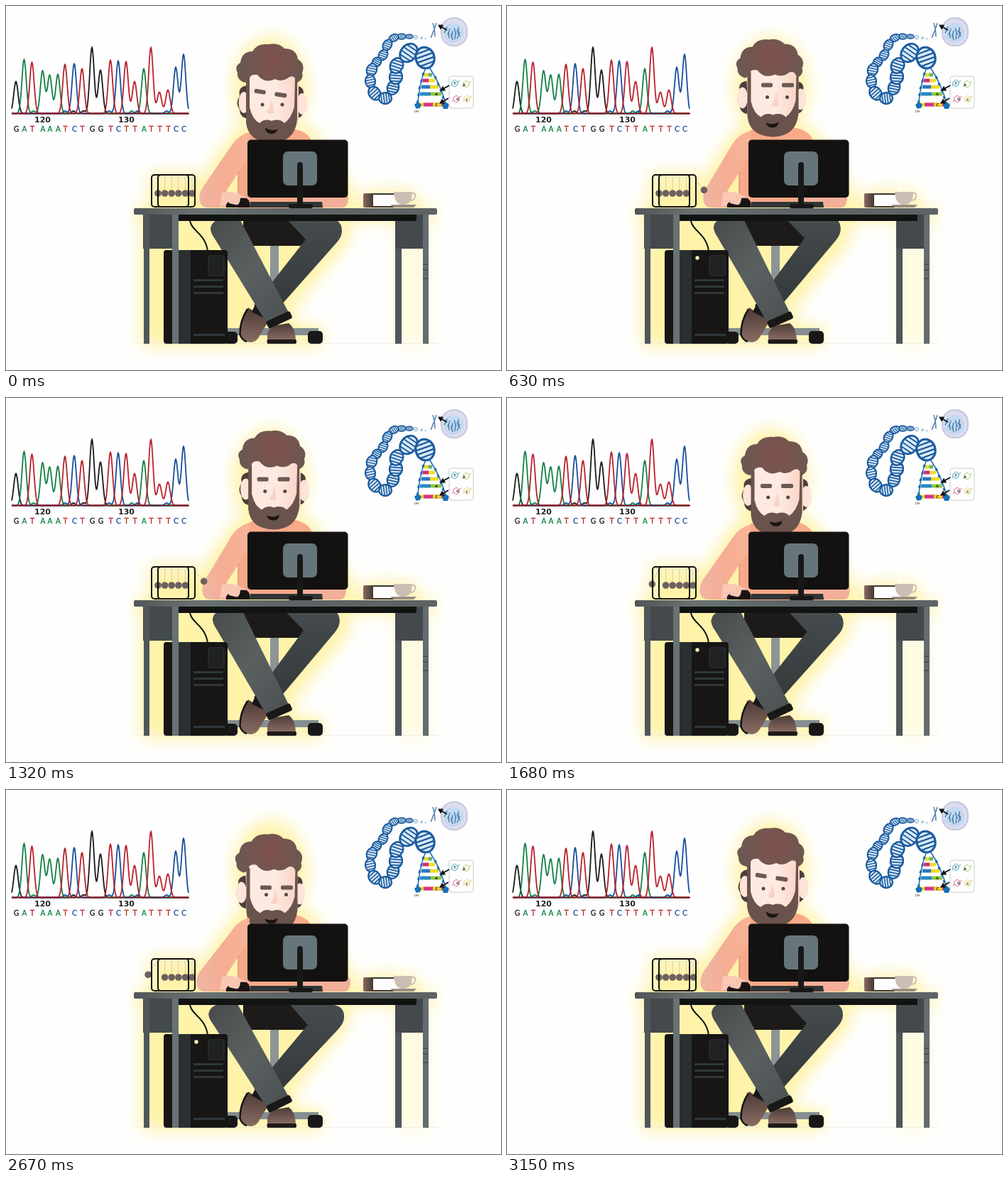
Recreate the animation shown at these times as an HTML page. Size 697 by 513 pixels, loop 3180 ms.

```html
<!DOCTYPE html>
<html lang="en">
<head>
<meta charset="utf-8">
<title>Sequencing desk</title>
<style>
html, body { margin: 0; width: 100%; height: 100%; overflow: hidden; background: #fefefe }
svg { display: block; width: 697px; height: 513px }
text { text-anchor: middle; font-family: "DejaVu Sans", sans-serif }
</style>
</head>
<body>
<svg viewBox="0 0 697 513" fill="none">
<defs>
  <filter id="blur" x="-20%" y="-20%" width="140%" height="140%"><feGaussianBlur stdDeviation="11"/></filter>
  <radialGradient id="hairFill" gradientUnits="userSpaceOnUse" cx="376" cy="78" r="50">
    <stop stop-color="#80524b"/><stop offset="1" stop-color="#6a5853"/>
  </radialGradient>
  <linearGradient id="skin"><stop stop-color="#fde9df"/><stop offset=".55" stop-color="#fdeae1"/><stop offset="1" stop-color="#fad2c3"/></linearGradient>
  <linearGradient id="sleeve" x1="0" x2="1"><stop stop-color="#f0b5a2"/><stop offset=".5" stop-color="#f5ad94"/><stop offset="1" stop-color="#f9b396"/></linearGradient>
  <linearGradient id="jeans" x1="0" y1="0" x2="1" y2="1"><stop stop-color="#484b4c"/><stop offset=".5" stop-color="#5a6060"/><stop offset="1" stop-color="#4b5052"/></linearGradient>
  <linearGradient id="shade" x2="0" y2="1"><stop stop-color="#454b4e"/><stop offset="1" stop-color="#343839"/></linearGradient>
  <linearGradient id="top"><stop stop-color="#505658"/><stop offset=".2" stop-color="#697271"/><stop offset=".5" stop-color="#5c6466"/><stop offset="1" stop-color="#5e6466"/></linearGradient>
  <linearGradient id="leather" x2="0" y2="1"><stop stop-color="#4c3a35"/><stop offset="1" stop-color="#8a6d63"/></linearGradient>
  <linearGradient id="cover"><stop stop-color="#8b6a60"/><stop offset=".25" stop-color="#3c3330"/><stop offset="1" stop-color="#3b3736"/></linearGradient>
</defs>

<g filter="url(#blur)" fill="#fff2a0" opacity=".9">
  <ellipse cx="372" cy="115" rx="53" ry="72"/>
  <path d="M325 170H430L492 265V300H260V265Z"/>
  <rect x="182" y="283" width="423" height="20" rx="6"/>
  <path d="M190 290H484V330L406 425V450H446V480H190Z"/>
  <path d="M546 300H597V478H546Z" opacity=".35"/>
  <rect x="201" y="235" width="68" height="55"/>
  <rect x="502" y="260" width="76" height="30"/>
</g>
<path d="M183 475.500H608" stroke="#e9e7e2" opacity=".6"/>

<g id="chart"></g>
<g id="dna"></g>

<!-- chair -->
<path d="M372 325H384V456H372Z" fill="#8c9495"/>
<path d="M312 454H440V464H312Z" fill="#858e91"/>
<rect x="307" y="459" width="19" height="17" rx="5" fill="#181818"/>
<rect x="425" y="458" width="21" height="18" rx="5" fill="#181818"/>
<rect x="334" y="296" width="92" height="42" rx="8" fill="#1d1b1a"/>

<!-- legs and shoes -->
<path d="M341 425Q329 444 329 462Q331 473 345 474Q354 473 358 463L370 444Z" fill="url(#leather)"/>
<path d="M340 427Q329 444 329.500 463Q332 471 339 473" stroke="#171514" stroke-width="2.500"/>
<path d="M368 471V462Q371 452 381 450L398 447Q407 453 408 471Z" fill="url(#leather)"/>
<rect x="367.500" y="470" width="41.500" height="6" rx="2" fill="#1f1a19"/>
<g id="rightLeg">
  <path d="M395 300H458Q473 302 473 317Q473 325 466 333L380 430L349 422L422 329Z" fill="url(#shade)"/>
  <path d="M352 419L378 432L371 444L346 431Z" fill="#191817"/>
</g>
<g id="leftLeg">
  <path d="M303 300H329L399 434L367 447L294 328Q288 320 288 313Q290 302 303 300Z" fill="url(#jeans)"/>
  <rect x="366" y="437" width="37" height="11" rx="3" fill="#191817" transform="rotate(-25 384 442)"/>
</g>

<!-- torso, head -->
<path id="torso" d="M326 285V205Q329 181 349 175L395 172Q420 174 428 186L448 225V285Z" fill="#f8a988"/>
<g id="head">
  <path d="M339 112Q326 114 329 127Q322 137 329 146Q329 157 341 159ZM409 112Q422 115 418 127Q425 138 419 147Q419 157 408 159Z" fill="#4c3e3b"/>
  <g id="ears" fill="#fde3d8"><ellipse cx="334" cy="136" rx="7.500" ry="15"/><ellipse cx="416" cy="138" rx="7.500" ry="15"/></g>
  <rect x="340" y="82" width="72" height="95" rx="20" fill="url(#skin)"/>
  <g id="beard">
    <path d="M339 98L344 102V143Q348 160 358 165Q366 158 375 162Q386 158 393 165Q403 158 407 142L408 102L411 98V160Q408 192 375 193Q342 192 339 164Z" fill="#6a534c"/>
    <path id="mouth" d="M365 173Q374 177 383 172Q382 180 374 180Q367 180 365 173Z" fill="#1d1513"/>
  </g>
  <g id="face">
    <g id="brows" fill="#6a5a54"><rect x="356" y="119" width="16" height="6" rx="2"/><rect x="385" y="119" width="17" height="6" rx="2"/></g>
    <g fill="#59463f"><circle cx="364.500" cy="139" r="2.500"/><circle cx="392.500" cy="139" r="2.500"/></g>
    <path d="M377 132Q383 150 379 152Q373 153 371 149Q375 146 377 132Z" fill="#f9d3c5"/>
  </g>
  <path d="M337 108Q325 105 326 94Q321 85 330 80Q332 64 347 64Q354 52 370 54Q384 51 392 60Q409 60 411 75Q422 82 417 94Q420 103 410 108Q407 97 399 100Q389 108 379 103Q364 110 354 97Q343 95 342 105Z" fill="url(#hairFill)"/>
</g>
<g id="arms">
  <path id="leftArm" fill="url(#sleeve)"/>
  <path id="rightArm" fill="#f3af99"/>
  <path d="M327 233V263" stroke="#dc8e73"/>
  <path d="M304 263Q321 260 330 266Q339 268 340 274Q334 279 331 275Q331 286 323 280Q318 286 314 280L301 283Z" fill="#fac7b5"/>
</g>

<!-- cradle -->
<g id="strings" stroke="#c6c0b6" stroke-width=".7"></g>
<g id="balls" fill="#6c6060"></g>
<g stroke="#111" stroke-width="2"><rect x="205" y="238" width="52" height="45" rx="4"/><rect x="214" y="238" width="52" height="45" rx="4"/></g>

<!-- desktop objects -->
<path d="M310 284Q308 275 322 275Q329 269 339 271Q345 276 343 284Z" fill="#171514"/>
<path d="M316 264Q325 262 330 271Q329 282 323 280L314 278Z" fill="#fac7b5"/>
<path d="M344 276H445L446 284H343Z" fill="#303536"/>
<rect x="340" y="188.500" width="141.500" height="81.500" rx="5" fill="#131210"/>
<rect x="390" y="205" width="48" height="48" rx="7" fill="#66757a"/>
<rect x="410" y="220" width="8" height="63" rx="4" fill="#191818"/>
<rect x="398" y="279" width="34" height="6" rx="2" fill="#191818"/>
<rect x="503" y="264" width="61" height="20" rx="2" fill="url(#cover)"/>
<path d="M517 266H564V282H517Z" fill="#fff"/>
<path id="steam" stroke="#fffef4" stroke-width="3" stroke-linecap="round"/>
<path id="saucer" d="M541 280H578L574 284H546Z" fill="#9a8d86"/>
<g id="cup">
  <path d="M546 262H572Q572 279 561 280H556Q547 278 546 262Z"/>
  <path id="handle" d="M571 264Q577 262 576 269Q575 274 569 274" stroke-width="1.800"/>
</g>

<!-- computer -->
<path d="M259 303C262 318 280 320 284 345" stroke="#171717" stroke-width="2"/>
<rect x="222" y="344" width="90" height="132" rx="4" fill="#171615"/>
<path d="M243 344H260V476H243Z" fill="#2a3032"/>
<rect x="285" y="352" width="22" height="28" rx="2" fill="#202122" stroke="#31383a"/>
<path d="M264 386.500H306M264 395.500H306M264 404.500H306M264 463.500H308" stroke="#30373a" stroke-width="3"/>
<circle id="led" cx="268" cy="355" r="2.700" fill="#fff3b8"/>

<!-- desk -->
<path d="M193 294H237V342H193ZM548 294H592V342H548Z" fill="#43494c"/>
<path d="M194 294H202V476H194ZM548 342H557V476H548Z" fill="#50575a"/>
<path d="M243 294H578V303H243Z" fill="#121414"/>
<path d="M234 294H243V476H234Z" fill="#687173"/>
<path d="M587 294H595V476H587Z" fill="#646c6f"/>
<path d="M587 364H594M587 372H594M587 384H594" stroke="#323839"/>
<rect x="180" y="285" width="427" height="9" rx="2" fill="url(#top)"/>
</svg>
<script>
const LOOP = 3180;
const $ = id => document.getElementById(id);
const clamp = (v, a, b) => Math.max(a, Math.min(b, v));
const move = (id, value) => $(id).setAttribute('transform', value);
const ink = { G: '#191919', A: '#118044', T: '#b9202c', C: '#164f9c' };

function drawChart() {
  const bases = 'GATAAATCTGGTCTTATTTCC';
  const xs = [14, 25.5, 36.5, 51.5, 61.5, 73, 83, 96, 107, 121, 133, 147, 158, 169, 181, 194, 204, 216, 228, 239, 250];
  const tops = [106, 75, 79, 91, 97, 96, 82, 81, 88, 58, 90, 76, 77, 78, 106, 88, 58, 121, 118, 86, 68];
  const noise = { G: [95, 109], A: [39, 177], T: [], C: [83, 145, 185, 226] };
  const bell = (x, c, s) => Math.exp(-((x - c) ** 2) / (2 * s * s));
  let out = '';
  for (const base of 'GACT') {
    let d = '';
    for (let x = 8; x <= 257; x += .5) {
      let y = 151.5;
      xs.forEach((c, i) => { if (bases[i] === base) y -= (151 - tops[i]) * bell(x, c, 3.1); });
      noise[base].forEach(c => y -= 3.5 * bell(x, c, 2.5));
      d += (d ? 'L' : 'M') + x + ' ' + y.toFixed(1);
    }
    out += `<path d="${d}" stroke="${ink[base]}" stroke-width="1.800"/>`;
  }
  out += '<path d="M8 151.500H258" stroke="#8e1c24" stroke-width="1.500"/>';
  [[51.5, 120], [169.5, 130]].forEach(([x, n]) =>
    out += `<text x="${x}" y="164" font-size="11" font-weight="bold" fill="#222">${n}</text>`);
  xs.forEach((x, i) => out += `<text x="${x + .5}" y="176.500" font-size="10" fill="${ink[bases[i]]}" stroke="${ink[bases[i]]}" stroke-width=".3">${bases[i]}</text>`);
  $('chart').innerHTML = out;
}

function drawDna() {
  // x, y, half length, half width, turn
  const beads = [[568, 43, 5, 3, 0], [557, 43, 6, 4, 0], [546, 45, 7, 5, -25], [537, 55, 8, 6, -60], [531, 69, 8, 6, -60],
    [522, 79, 7, 6, -50], [515, 90, 9, 7, -70], [513, 106, 9, 7, 85], [519, 123, 10, 8, 55], [534, 130, 9, 8, 0],
    [545, 115, 10, 8, -70], [549, 100, 10, 9, -80], [550, 84, 11, 9, -65], [567, 66, 14, 11, -50], [590, 73, 15, 13, 75]];
  let out = '<circle cx="591" cy="46" r="1.500" fill="#c5d3e4"/><circle cx="585" cy="45" r="2" fill="#a9c6e0"/><circle cx="577" cy="44" r="2.500" stroke="#639cca"/>';
  for (const [x, y, a, b, turn] of beads) {
    let d = '';
    for (let k = -.6; k < .7; k += .4) {
      const h = b * Math.sqrt(1 - k * k);
      d += `M${a * k - 1} ${-h}L${a * k + 1} ${h}`;
    }
    out += `<g transform="translate(${x} ${y}) rotate(${turn})" stroke="#1c5c9f"><ellipse rx="${a}" ry="${b}" fill="#dcebf7" stroke-width="${1 + b / 6}"/><path d="${d}" stroke-width="${.6 + b / 8}"/></g>`;
  }
  // nucleus and chromosome
  out += `<rect x="613" y="17" width="36" height="39" rx="17" fill="#dcdced" stroke="#c5c6df" stroke-width="2"/>
    <circle cx="630" cy="38" r="14" fill="#c4d9ee"/>`;
  for (let i = 0; i < 10; i++) {
    const x = 621 + i * 2, y = 32 + i * 7 % 11, lean = i * 5 % 9 - 4;
    out += `<path d="M${x} ${y - 3}L${x + lean} ${y + 6}" stroke="#4c84b9" stroke-width="1.500"/>`;
  }
  out += `<path d="M601 24Q604 33 604 43M606 24Q603 34 598 45" stroke="#5a87b3" stroke-width="1.600"/>`;
  // opened ladder
  const rungs = [[97, 589, 600, '#f0d92c', '#69b75a'], [105, 587, 604, '#d62d72', '#f4df29'], [114, 585, 609, '#2a78c2', '#f3d825'],
    [124, 583, 613, '#258bc4', '#91c83d'], [139, 582, 618, '#f0da22', '#d62d7c']];
  for (const [y, l, r, c1, c2] of rungs) {
    const m = (l + r) / 2;
    out += `<path d="M${l} ${y}H${m}" stroke="${c1}" stroke-width="5"/><path d="M${m} ${y}H${r}" stroke="${c2}" stroke-width="5"/>`;
  }
  out += `<path d="M588 139H601" stroke="#d8318b" stroke-width="5"/><path d="M601 139H613" stroke="#ecd52e" stroke-width="5"/>
    <path d="M591 87Q582 108 579 145M597 88Q613 112 620 142" stroke="#176ab0" stroke-width="1.500"/>
    <path d="M588 94L582 117L579 140M604 99L613 121L619 139" stroke="#176ab0" stroke-width="3" stroke-dasharray="4 6"/>
    <path d="M575 139L580 135L585 139L583 144H577ZM614 139L619 135L624 139L622 145H616Z" fill="#1672b5"/>
    <text x="578" y="150" font-size="4.500" fill="#333">OH</text>
    <g font-size="5" font-weight="bold" fill="#222"><text x="606" y="126">A</text><text x="606" y="141">C</text></g>
    <rect x="624" y="99" width="34" height="45" rx="3" fill="#fefefe" stroke="#c9c9c9"/>`;
  const ring = (x, y, c) => out += `<path d="M${x - 4} ${y - 2}L${x} ${y - 5}L${x + 4} ${y - 2}V${y + 2}L${x} ${y + 5}L${x - 4} ${y + 2}ZM${x + 4} ${y - 2}L${x + 7} ${y - 4}M${x - 4} ${y + 2}L${x - 6} ${y + 4}" stroke="${c}"/>`;
  ring(632, 109, '#3fa7cd'); ring(648, 110, '#a7cf61'); ring(634, 131, '#df6795'); ring(649, 131, '#dfd456');
  [[632, 111, 'T'], [645, 113, 'A'], [636, 133, 'G'], [649, 134, 'C']].forEach(([x, y, s]) =>
    out += `<text x="${x}" y="${y}" font-size="5" font-weight="bold" fill="#333">${s}</text>`);
  [[621, 34, 210], [624, 112, 150], [623, 130, 150]].forEach(([x, y, a]) =>
    out += `<path transform="translate(${x} ${y}) rotate(${a})" d="M0-1H8V-4L15 0L8 4V1H0Z" fill="#111"/>`);
  $('dna').innerHTML = out;
}

// eased value between [time, value] points
function track(points, t) {
  const i = Math.max(1, points.findIndex(p => p[0] >= t));
  const [t0, a] = points[i - 1], [t1, b] = points[i];
  const u = (t - t0) / (t1 - t0);
  return a + (b - a) * u * u * (3 - 2 * u);
}

const nod = [[0, 0], [270, 3], [510, 1], [750, -14], [990, 4], [1440, -10], [1680, 1], [2190, 12], [2400, 12], [3150, 0], [LOOP, 0]];
const sway = [[0, 0], [630, -1.5], [990, 1], [1680, 5], [2190, -1.5], [2670, -1.5], [3150, 0], [LOOP, 0]];
const gaze = [[0, -1], [450, -1], [630, 1], [750, 1], [960, -1], [1680, -.5], [2190, 1], [2670, 1], [3150, -1], [LOOP, -1]];
const lift = [[0, 0], [510, 0], [630, -4], [750, -4], [960, 0], [LOOP, 0]];
const smirk = [[0, 1], [510, 0], [2670, 0], [3150, 1], [LOOP, 1]];
const swingLeft = [45, 45, 62, 62], swingRight = [40, 60, 86, 60];
const pivots = [214, 223.6, 233.2, 242.8, 252.4, 262];

function swing(t) {
  const period = LOOP / 4, n = Math.floor(t / period);
  const s = Math.sin(t / period * 2 * Math.PI);
  const pulse = Math.abs(s) ** 2.5;
  const left = s > 0 ? -swingLeft[n] * pulse : 0;
  const right = s < 0 ? swingRight[n] * pulse : 0;
  pivots.forEach((x, i) => {
    const a = (i === 0 ? left : i === 5 ? right : 0) * Math.PI / 180;
    const bx = x + 26 * Math.sin(a), by = 240 + 24 * Math.cos(a);
    const ball = $('balls').children[i], line = $('strings').children[i];
    ball.setAttribute('cx', bx);
    ball.setAttribute('cy', by);
    line.setAttribute('d', `M${x} 240L${bx} ${by}`);
  });
}

function person(t) {
  const dy = track(nod, t), yaw = track(gaze, t), up = track(lift, t), tilt = track(smirk, t);
  const bend = clamp(dy / 5, -1, 1);
  move('head', `translate(${track(sway, t)} ${dy})`);
  move('face', `translate(${3.5 * yaw} ${up})`);
  move('beard', `translate(${yaw} ${up / 2})`);
  move('ears', `translate(${-yaw} 0)`);
  move('brows', `translate(${-1.5 + 1.5 * yaw} ${clamp(dy, 0, 7) + tilt}) rotate(${tilt * 9} 379 122)`);
  move('mouth', `rotate(${tilt * 10} 374 176)`);
  move('torso', `translate(0 ${bend * 2})`);
  move('leftLeg', `rotate(${-1.3 * bend} 385 440)`);
  move('rightLeg', `rotate(${1.6 * bend} 355 430)`);
  const e = 273 - 4 * bend, s = 182 + bend * 2, r = 481 + 3 * bend;
  $('leftArm').setAttribute('d', `M343 ${s - 4}Q326 ${s} 316 ${s + 17}L${e + 3} 257Q${e - 4} 272 ${e + 2} 280Q${e + 4} 284 ${e + 12} 284H318V264L310 261L327 235L341 ${s + 30}Z`);
  $('rightArm').setAttribute('d', `M418 284V264H${r - 8}Q${r} 262 ${r + 1} 269Q${r + 1} 284 ${r - 8} 284Z`);
}

function coffee(t) {
  const u = clamp((t - 1890) / 600, 0, 1), h = 4 * u * (1 - u);
  move('cup', `translate(${-2 * h} ${-56 * h}) rotate(${-7 * h} 560 271)`);
  move('saucer', `translate(0 ${-34 * h}) rotate(${8 * h} 559 282)`);
  const mix = (a, b) => Math.round(a + (b - a) * h);
  const tone = `rgb(${mix(204, 235)},${mix(190, 237)},${mix(180, 242)})`;
  $('cup').setAttribute('fill', tone);
  $('handle').setAttribute('fill', 'none');
  $('handle').setAttribute('stroke', tone);
  const w = 3 * Math.sin(t / LOOP * 12 * Math.PI);
  $('steam').setAttribute('d', `M554 259Q${551 + w} 254 554 250T553 243M565 259Q${568 - w} 253 565 249T566 242`);
  $('steam').setAttribute('opacity', .8 * (1 - h) * (.5 + .5 * Math.sin(t / LOOP * 6 * Math.PI - 1.5)));
}

function frame() {
  const t = (performance.now() - start) % LOOP, blink = t % 1060 / 1060;
  swing(t);
  person(t);
  coffee(t);
  $('led').setAttribute('opacity', blink > .45 && blink < .95 ? 1 : 0);
  requestAnimationFrame(frame);
}

drawChart();
drawDna();
$('balls').innerHTML = '<circle r="4.800"/>'.repeat(6);
$('strings').innerHTML = '<path/>'.repeat(6);
const start = performance.now();
frame();
</script>
</body>
</html>
```
